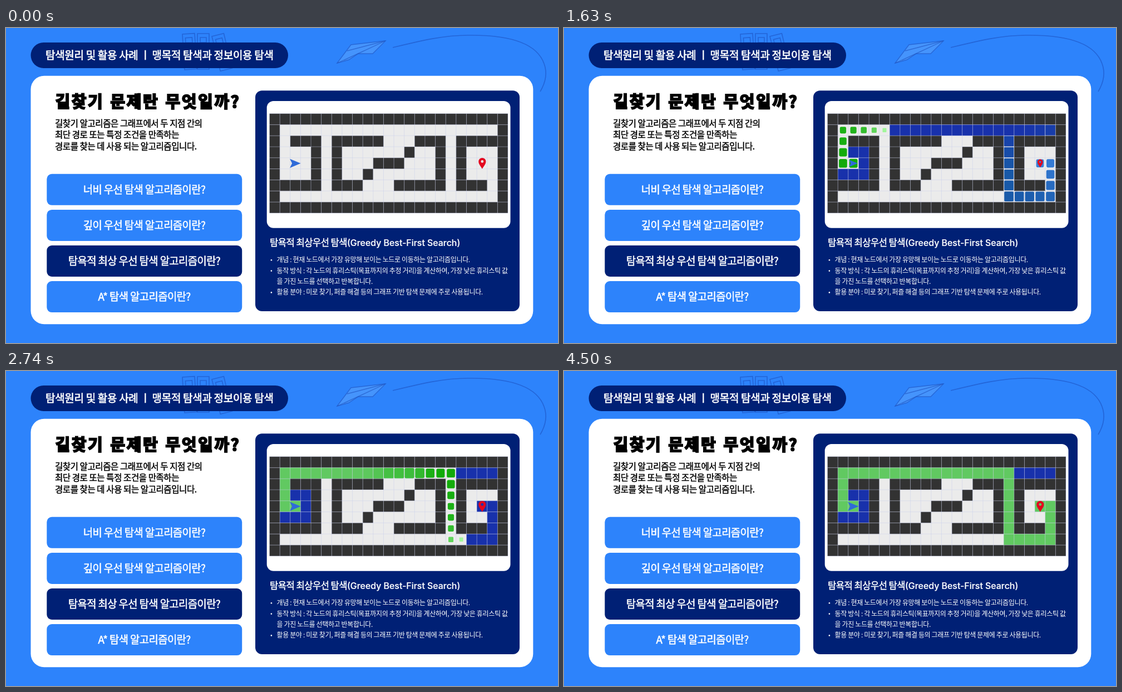
These frames come from a looping animation (992 by 565 pixels, 6010 ms). An HTML page with a canvas:

```html
<!DOCTYPE html>
<html lang="ko">
<head>
<meta charset="utf-8">
<title>길찾기</title>
<style>
html, body { margin: 0; width: 100%; height: 100%; overflow: hidden; background: #2d83fb; }
canvas { display: block; width: 992px; height: 565px; }
</style>
</head>
<body>
<canvas id="stage" width="992" height="565"></canvas>
<script>
const LOOP = 6010;
const ctx = document.getElementById('stage').getContext('2d');
const KR = '"Noto Sans CJK KR", "Noto Sans CJK", sans-serif';
const BLUE = '#2d83fb', NAVY = '#002075';

const X0 = 473.5, Y0 = 153.5, CW = 18.63, CH = 19.83;
const MAZE = [
  '#######################',
  '#.....................#',
  '#.###.#####...###.#####',
  '#...#.#......#..#.#...#',
  '#...#.#...###...#.#...#',
  '#...#.#..#......#.#...#',
  '#####.###...#####.###.#',
  '#.....................#',
  '#######################'
];
const START = { x: 2, y: 4 }, GOAL = { x: 20, y: 4 };
const keyOf = ({ x, y }) => x + ',' + y;

// Greedy best-first search: the open cell nearest to the goal goes first
function search() {
  const first = { ...START, g: 0, h: Infinity };
  const open = [first], known = new Map([[keyOf(first), first]]);
  const visited = [];
  while (open.length) {
    const node = open.reduce((a, b) => b.h < a.h ? b : a);
    open.splice(open.indexOf(node), 1);
    node.closed = true;
    visited.push(node);
    if (keyOf(node) === keyOf(GOAL)) break;
    for (const [dx, dy] of [[1, 0], [0, -1], [0, 1], [-1, 0]]) {
      const x = node.x + dx, y = node.y + dy, g = node.g + 1;
      if (MAZE[y][x] === '#') continue;
      const old = known.get(keyOf({ x, y }));
      if (!old) {
        const h = Math.abs(GOAL.x - x) + Math.abs(GOAL.y - y);
        const next = { x, y, g, h, parent: node };
        known.set(keyOf(next), next);
        open.push(next);
      } else if (!old.closed && g <= old.g) {
        Object.assign(old, { g, parent: node });
      }
    }
  }
  const route = [];
  for (let n = visited[visited.length - 1]; n; n = n.parent) route.unshift(n);
  return { visited, route };
}

const found = search();
const orderOf = nodes => new Map(nodes.map((n, i) => [keyOf(n), i]));

// Colours are spread evenly over the life of a wave; later waves cover earlier ones
const LIFE = 1000;
const WAVES = [
  { order: orderOf(found.route), first: 1146, step: 58.5, size: .36, power: 1.7,
    colors: [[168, 250, 162], [28, 177, 22], [16, 170, 8], [66, 191, 64], [97, 201, 97]] },
  { order: orderOf(found.visited), first: 30, step: 25, size: .3, power: 1.4,
    colors: [[255, 255, 0], [64, 136, 229], [56, 127, 218], [24, 89, 168], [24, 49, 171]] }
];

// The standard CSS "ease" curve
function ease(x) {
  let lo = 0, hi = 1, s = .5;
  for (let i = 0; i < 14; i++) {
    if (.75 * s * (1 - s) + s ** 3 < x) lo = s; else hi = s;
    s = (lo + hi) / 2;
  }
  return .3 * s * (1 - s) ** 2 + 3 * s * s * (1 - s) + s ** 3;
}

const mix = (a, b, k) => a + (b - a) * k;

function poseAt({ size, power, colors }, age) {
  const k = Math.min(age / LIFE, 1);
  const parts = colors.length - 1;
  const i = Math.min(Math.floor(k * parts), parts - 1);
  const part = ease(k * parts - i);
  const sizeAt = n => 1 - (1 - size) * (1 - n / parts) ** power;
  return {
    scale: mix(sizeAt(i), sizeAt(i + 1), part),
    corner: .22 * Math.sin(Math.PI * Math.sqrt(k)),
    color: `rgb(${colors[i].map((v, n) => Math.round(mix(v, colors[i + 1][n], part)))})`
  };
}

function poseOf(key, t) {
  for (const wave of WAVES) {
    const age = t - wave.first - wave.order.get(key) * wave.step;
    if (age >= 0) return poseAt(wave, age);
  }
  return null;
}

function box(x, y, w, h, r, fill) {
  ctx.fillStyle = fill;
  ctx.beginPath();
  ctx.roundRect(x, y, w, h, r);
  ctx.fill();
}

function text(str, x, y, size, { color = '#fff', gap = 0, heavy = 0, align = 'left', font = KR, weight = 400, wordGap = 0 } = {}) {
  ctx.font = `${weight} ${size}px ${font}`;
  ctx.letterSpacing = gap + 'px';
  ctx.wordSpacing = wordGap + 'px';
  ctx.textAlign = align;
  ctx.fillStyle = ctx.strokeStyle = color;
  ctx.fillText(str, x, y);
  if (heavy) {
    ctx.lineWidth = heavy;
    ctx.strokeText(str, x, y);
  }
}

function line(path, width, fill) {
  const p = new Path2D(path);
  if (fill) {
    ctx.fillStyle = fill;
    ctx.fill(p);
  }
  ctx.strokeStyle = 'rgba(28,80,190,.58)';
  ctx.lineWidth = width;
  ctx.stroke(p);
}

function drawBook(x, y, w, tilt) {
  ctx.save();
  ctx.translate(x, y);
  ctx.rotate(tilt);
  line(`M0 0H${w}V64H0ZM5 7H${w - 5}V16H5Z`, 1.6);
  ctx.restore();
}

function drawBackdrop() {
  ctx.fillStyle = BLUE;
  ctx.fillRect(0, 0, 992, 565);
  drawBook(317, 11, 22, -.06);
  drawBook(344, 10, 21, 0);
  drawBook(370, 15, 22, -.24);
  line('M595 63L620 30L682 23L659 46L633 46L616 57Z', 1.4, 'rgba(130,190,255,.28)');
  line('M595 63L682 23L607 58M682 23L613 41M633 46L682 23', 1.3);
  line('M695 35C745 23 785 13 830 13C903 12 954 27 967 64C974 83 969 99 960 114', 1.6);

  box(44.5, 26, 462.5, 46, 23, NAVY);
  text('탐색원리 및 활용 사례 ㅣ 맹목적 탐색과 정보이용 탐색', 71, 55.5, 19, { gap: -.3, heavy: .65 });
  box(44.5, 85.7, 902.8, 445.6, 24, '#fff');
}

function drawLeft() {
  const color = '#000';
  text('길찾기 문제란 무엇일까?', 88.5, 143, 29, { color, weight: 900, heavy: 2.2, gap: 2.6, wordGap: 2 });
  ['길찾기 알고리즘은 그래프에서 두 지점 간의', '최단 경로 또는 특정 조건을 만족하는', '경로를 찾는 데 사용 되는 알고리즘입니다.']
    .forEach((s, i) => text(s, 88, 177 + i * 20.3, 15.5, { color, gap: -.41, heavy: .45 }));
  ['너비 우선 탐색 알고리즘이란?', '깊이 우선 탐색 알고리즘이란?', '탐욕적 최상 우선 탐색 알고리즘이란?', 'A* 탐색 알고리즘이란?']
    .forEach((s, i) => {
      const y = 261.8 + i * 64.1;
      box(73.3, y, 350.9, 56, 9, i === 2 ? NAVY : BLUE);
      text(s, 248.5, y + 35, 18.8, { gap: -.58, heavy: .55, align: 'center' });
    });
}

function drawPanel() {
  box(448, 112.3, 475, 395.7, 12, NAVY);
  box(468.7, 131, 437.8, 227.7, 12, '#fff');
  text('탐욕적 최상우선 탐색', 474, 391, 16.5, { gap: -.45, heavy: .5 });
  text('(Greedy Best-First Search)', 613, 391, 15.9, { font: 'Inter, sans-serif', weight: 500, heavy: .2 });
  [
    '개념 : 현재 노드에서 가장 유망해 보이는 노드로 이동하는 알고리즘입니다.',
    '동작 방식 : 각 노드의 휴리스틱(목표까지의 추정 거리)을 계산하여, 가장 낮은 휴리스틱 값',
    '을 가진 노드를 선택하고 반복합니다.',
    '활용 분야 : 미로 찾기, 퍼즐 해결 등의 그래프 기반 탐색 문제에 주로 사용됩니다.'
  ].forEach((s, i) => {
    const y = 420.2 + i * 19.4;
    text(s, 486.5, y, 12, { gap: -.36 });
    if (i !== 2) box(475.6, y - 5.3, 2.6, 2.6, 1.3, '#fff');
  });
}

function drawArrow() {
  ctx.fillStyle = '#2f6bd8';
  ctx.fill(new Path2D('M-10 -8L9.5 0L-10 8.2L-6 0Z'));
}

function drawPin() {
  ctx.fillStyle = '#e3061f';
  ctx.fill(new Path2D('M.4 10C-2 5.5 -6.2 1.5 -6.2 -3.2A6.6 6.6 0 0 1 7 -3.2C7 1.5 2.8 5.5 .4 10ZM-2 -3.3A2.4 2.4 0 1 0 2.8 -3.3A2.4 2.4 0 1 0 -2 -3.3Z'), 'evenodd');
}

function drawIcon(cell, t, draw) {
  const pose = poseOf(keyOf(cell), t);
  const scale = pose ? pose.scale : 1;
  ctx.save();
  ctx.translate(X0 + (cell.x + .5) * CW, Y0 + (cell.y + .5) * CH);
  ctx.scale(scale, scale);
  draw();
  ctx.restore();
}

function drawGrid() {
  ctx.strokeStyle = 'rgba(198,204,234,.45)';
  ctx.lineWidth = 1;
  ctx.beginPath();
  for (let c = 0; c <= 23; c++) {
    ctx.moveTo(X0 + c * CW, Y0);
    ctx.lineTo(X0 + c * CW, Y0 + 9 * CH);
  }
  for (let r = 0; r <= 9; r++) {
    ctx.moveTo(X0, Y0 + r * CH);
    ctx.lineTo(X0 + 23 * CW, Y0 + r * CH);
  }
  ctx.stroke();
}

function drawMaze(t) {
  ctx.fillStyle = '#ebebeb';
  ctx.fillRect(X0, Y0, 23 * CW, 9 * CH);
  MAZE.forEach((row, y) => [...row].forEach((kind, x) => {
    const left = X0 + x * CW, top = Y0 + y * CH;
    if (kind === '#') {
      ctx.fillStyle = '#323232';
      ctx.fillRect(left, top, CW, CH);
      return;
    }
    const pose = poseOf(keyOf({ x, y }), t);
    if (!pose) return;
    const w = CW * pose.scale, h = CH * pose.scale;
    box(left + (CW - w) / 2, top + (CH - h) / 2, w, h, w * pose.corner, pose.color);
  }));
  drawGrid();
  drawIcon(START, t, drawArrow);
  drawIcon(GOAL, t, drawPin);
}

const began = performance.now();
function frame() {
  const t = (performance.now() - began) % LOOP;
  drawBackdrop();
  drawLeft();
  drawPanel();
  drawMaze(t);
  requestAnimationFrame(frame);
}
frame();
</script>
</body>
</html>
```
